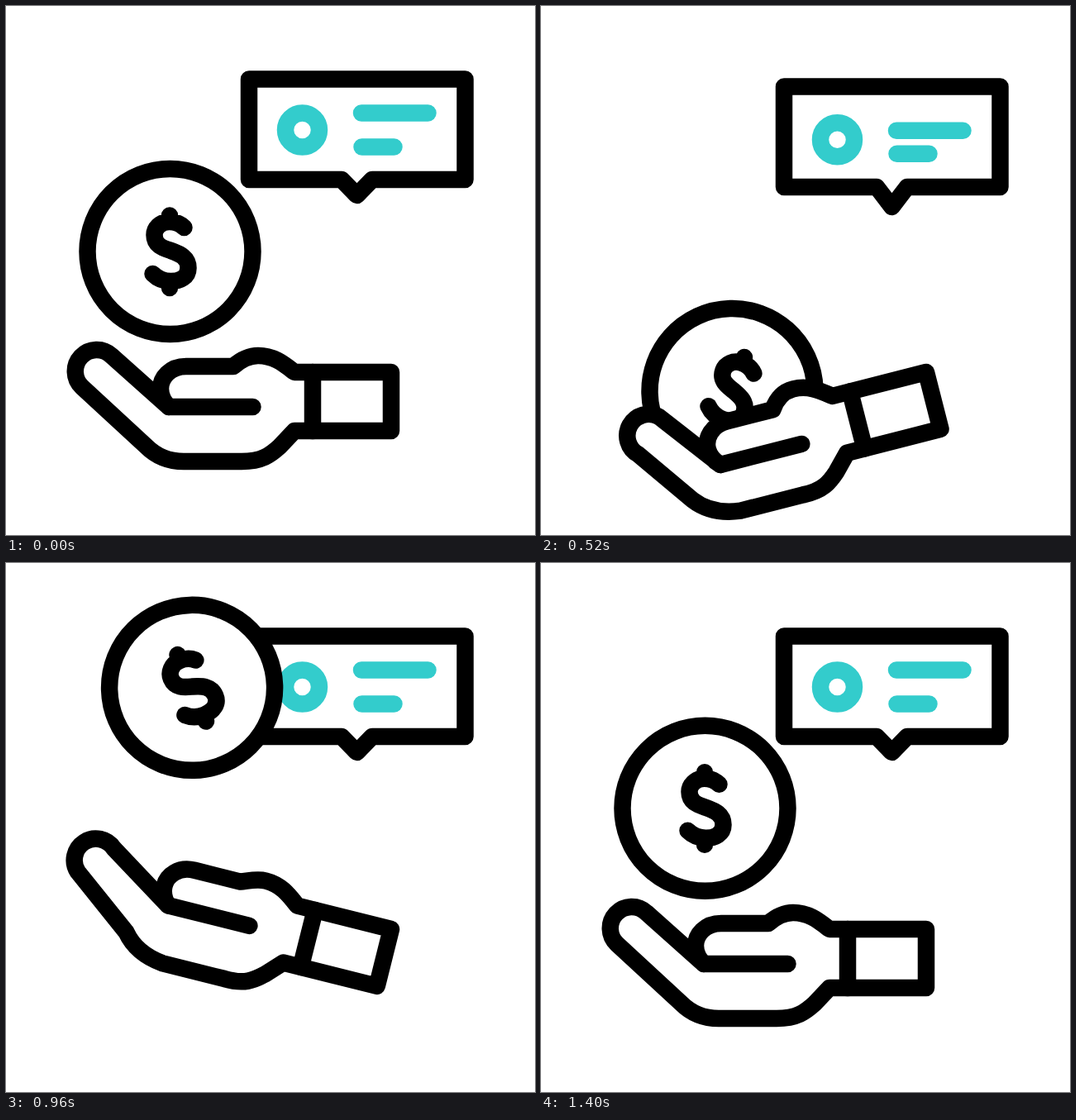
Write an HTML page that moves like this. It is 640x640 px and loops after 2 s.

```html
<!DOCTYPE html>
<html lang="en">
<head>
<meta charset="utf-8">
<title>Coin and hand</title>
<style>
  html, body { margin: 0; width: 100%; height: 100%; overflow: hidden; background: #fff; }
  svg { display: block; width: 100%; height: 100%; }
  svg * { stroke-width: 20.5; stroke-linecap: round; stroke-linejoin: round; }
</style>
</head>
<body>
<svg viewBox="0 0 640 640" fill="#fff" stroke="#000">
  <path id="bubble"/>
  <g stroke="#3cc" fill="none">
    <circle id="ring" cx="358.5" cy="150" r="20.5"/>
    <path id="lines"/>
  </g>
  <g id="coin">
    <circle r="100"/>
    <path fill="none" d="M17-29C11-35 4-36-1-36C-12-36-19-28-19-20C-19-7-8-4 1-1C12 3 22 7 22 20C22 31 12 36 1 36C-8 36-15 33-21 27M-.5-43.5V-36M-.5 44V36"/>
  </g>
  <g id="hand">
    <path id="outline"/>
    <path id="creases" fill="none"/>
  </g>
</svg>
<script>
const LOOP = 2000, STEP = 40;
const el = id => document.getElementById(id);
const set = (id, name, value) => el(id).setAttribute(name, value);
const mix = (a, b, p) => a + (b - a) * p;

// Eased value at time t through [time, value] keys
function track(t, ...keys) {
  const i = keys.findIndex(k => k[0] > t);
  if (i < 0) return keys[keys.length - 1][1];
  if (!i) return keys[0][1];
  const [t0, a] = keys[i - 1], [t1, b] = keys[i];
  const p = (t - t0) / (t1 - t0);
  return mix(a, b, p * p * (3 - 2 * p));
}

const swing = (t, down, up) => track(t, [80, 0], [520, down], [880, up], [1300, 0]);
const bounce = (t, down, up) => track(t, [80, 0], [350, down], [440, down], [680, up], [920, 0]);

function drawBubble(t) {
  const y = bounce(t, 19, -20), tip = 229 + bounce(t, 7, 0);
  set('bubble', 'd', `M294 88.5H555.5V210H443L424.5 ${tip}L406 210H294Z`);
  set('bubble', 'transform', `translate(0 ${y})`);
  set('ring', 'cy', 150 + bounce(t, 28, -34.5));
  const mid = 150 + bounce(t, 33.5, -38.5), half = 20.5 - bounce(t, 6.5, 6.5);
  set('lines', 'd', `M430 ${mid - half}H510.5M430.5 ${mid + half}H469.5`);
}

// phase: 0 rest, 1 caught, 2 top of the throw, 3 rest
function drawCoin(t, phase) {
  const p = phase % 1;
  let x, y;
  if (phase < 1) {
    x = mix(198.5, 231.5, p ** 2.4);
    y = mix(297, 466, p);
  } else if (phase < 2) {
    x = 231.5 + 68 * p * (1 - p);
    y = mix(466, 132, p);
  } else {
    const q = phase - 2;
    x = mix(198.5, 232, (1 - q) ** 1.9);
    y = mix(132, 297, q);
  }
  set('coin', 'transform', `translate(${x} ${y}) rotate(${swing(t, 20, -25.6)})`);
}

function drawHand(t, phase) {
  const curl = phase < 1 ? phase : phase < 2 ? 3 - 2 * phase : phase - 3;
  const bend = Math.abs(curl);
  const finger = (x, y) => `${x + 12 * curl} ${y - 7.5 * curl}`;
  const thumb = (x, y) => `${x} ${y + 5 * curl}`;
  const palm = (x, y, dx, dy) => `${x - dx * bend} ${y - dy * bend}`;
  set('outline', 'd', `M${thumb(197, 485)}L${finger(127.5, 423)}
    A26 26 0 0 0 ${finger(92, 461)}
    L${palm(170, 533, 16, 10)}Q${palm(188, 551, 16, 5)} ${palm(215, 551, 8, 1)}
    H285C310 551 320 543 331 533L349 514H466V443H349
    C336 433 324 423 305 423C293 423 283 429 ${thumb(275, 436)}
    L${thumb(218, 436)}C${thumb(198, 436)} ${thumb(187, 450)} ${thumb(187, 463)}
    C${thumb(187, 472)} ${thumb(191, 479)} ${thumb(197, 485)}Z`);
  set('creases', 'd', `M${thumb(197, 485)}L${thumb(298.5, 485)}M371 443V514`);
  set('hand', 'transform', `rotate(${swing(t, -14.3, 15.5)} 466 443)`);
}

function draw() {
  const t = Math.floor(performance.now() % LOOP / STEP) * STEP;
  const phase = track(t, [80, 0], [520, 1], [840, 2], [1410, 3]);
  drawBubble(t);
  drawCoin(t, phase);
  drawHand(t, phase);
  requestAnimationFrame(draw);
}
draw();
</script>
</body>
</html>
```
